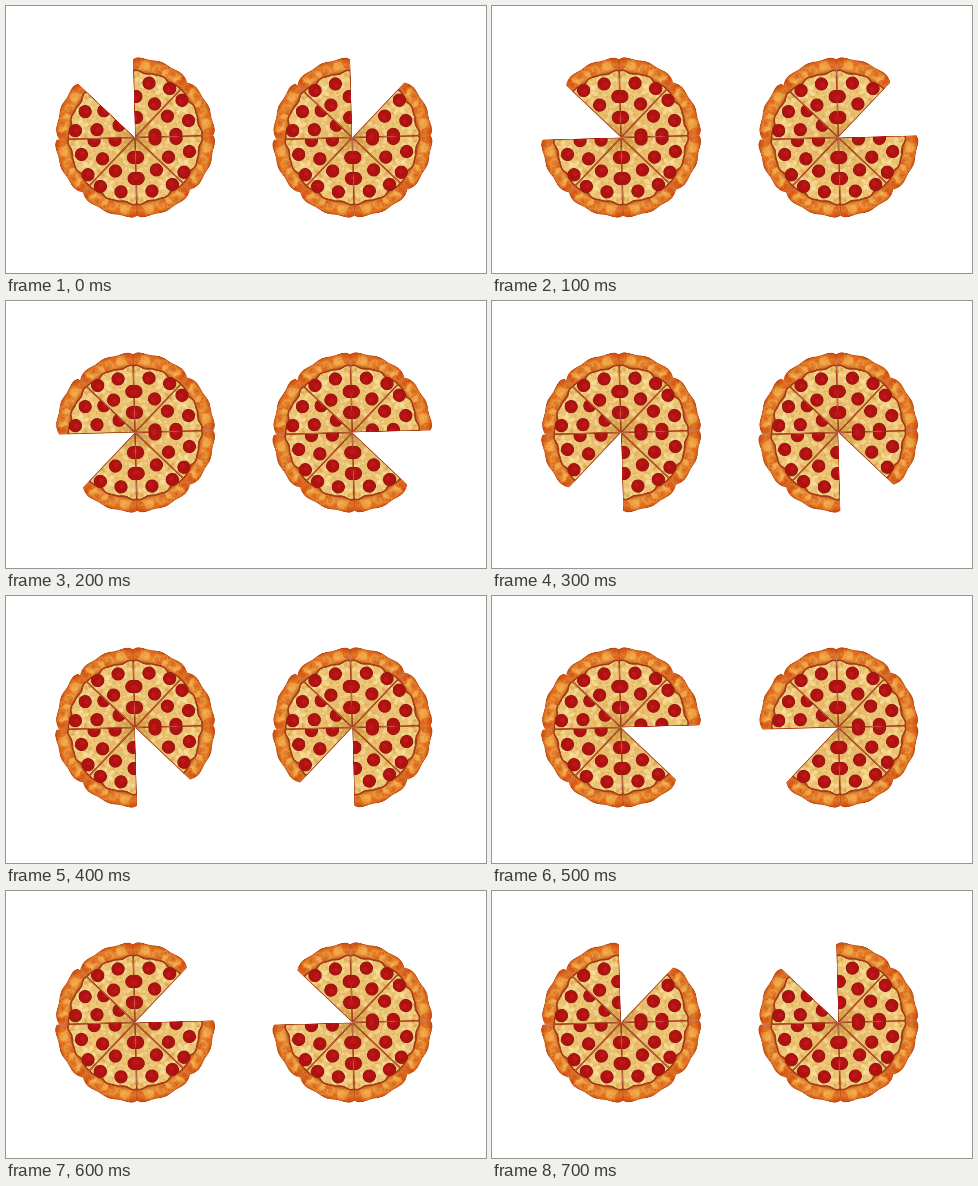
An HTML page with a canvas for the animation above (800 ms loop, 480 by 267 pixels).

```html
<!DOCTYPE html>
<html lang="en">
<head>
<meta charset="utf-8">
<title>Pizzas</title>
<style>
  html, body { margin: 0; height: 100%; overflow: hidden; background: #fff; }
  canvas { display: block; width: 100vw; height: 100vh; }
</style>
</head>
<body>
<canvas id="stage"></canvas>
<script>
const W = 480, H = 267, STEP = 100, SLICES = 8;
const TAU = Math.PI * 2, WEDGE = TAU / SLICES, TILT = -0.027;
const PAD = 2, SIZE = 86;
const scale = Math.max(1, window.devicePixelRatio || 1);
const stage = document.getElementById('stage');
stage.width = W * scale;
stage.height = H * scale;
const ctx = stage.getContext('2d');
ctx.scale(scale, scale);

// Pepperoni on one slice, whose first edge lies along the x axis
const pepperoni = [[20, 2], [41, 2], [33, 20.5], [54, 15.5], [48, 36]];

let seed = 7;
const rand = () => (seed = (seed * 16807) % 2147483647) / 2147483647;
const rim = t => 79.6 - 2 * t ** 4 - 1.5 * Math.abs(2 * t - 1) ** 12 + 0.6 * Math.sin(17 * t);
const cheeseEdge = t => 65.8 + Math.sin(13 * t + 1) + 0.5 * Math.sin(23 * t);

// Wedge with a wavy outer edge; t runs from 0 to 1 across the slice
function wedge(radius) {
  const path = new Path2D();
  path.moveTo(0, 0);
  for (let t = 0; t <= 1; t += 1 / 64) {
    const r = radius(t), a = t * WEDGE;
    path.lineTo(r * Math.cos(a), r * Math.sin(a));
  }
  path.closePath();
  return path;
}

function dot(c, x, y, r, fill) {
  c.fillStyle = fill;
  c.beginPath();
  c.arc(x, y, r, 0, TAU);
  c.fill();
}

function speckle(c, count, r0, r1, size, colors) {
  for (let i = 0; i < count; i++) {
    const a = rand() * WEDGE, r = Math.sqrt(r0 * r0 + rand() * (r1 * r1 - r0 * r0));
    dot(c, r * Math.cos(a), r * Math.sin(a), size * (0.4 + rand()), colors[i % colors.length]);
  }
}

function radial(c, r0, r1, colors) {
  const g = c.createRadialGradient(0, 0, r0, 0, 0, r1);
  colors.forEach((color, i) => g.addColorStop(i / (colors.length - 1), color));
  return g;
}

function bakeSlice() {
  const canvas = document.createElement('canvas');
  canvas.width = canvas.height = SIZE * scale * 2;
  const c = canvas.getContext('2d');
  c.scale(scale * 2, scale * 2);
  c.translate(PAD, PAD);
  const crust = wedge(rim), cheese = wedge(cheeseEdge);
  c.clip(crust);

  c.fillStyle = radial(c, 65, 80, ['#c2541a', '#e8973c', '#f0a545', '#e5852b', '#c04a0e']);
  c.fill(crust);
  speckle(c, 45, 68, 79, 2.2, ['rgba(200,62,10,.35)', 'rgba(250,190,95,.35)', 'rgba(222,98,20,.35)']);
  for (const a of [0, WEDGE]) {
    dot(c, 75 * Math.cos(a), 75 * Math.sin(a), 8, 'rgba(200,55,5,.4)');
  }
  c.strokeStyle = 'rgba(170,55,10,.6)';
  c.stroke(crust);

  c.fillStyle = radial(c, 0, 66, ['#cb9444', '#e6b968', '#ebc375', '#ebc375']);
  c.fill(cheese);
  c.save();
  c.clip(cheese);
  speckle(c, 150, 6, 66, 1.7, ['rgba(252,230,165,.55)', 'rgba(212,150,55,.4)', 'rgba(244,206,125,.5)']);
  c.restore();
  c.strokeStyle = '#a33a16';
  c.lineWidth = 1.6;
  c.stroke(cheese);

  for (const [x, y] of pepperoni) {
    dot(c, x, y, 6.6, '#8f1a10');
    dot(c, x, y, 5.8, '#b01212');
    dot(c, x - 1, y - 1, 2.5, 'rgba(200,28,24,.6)');
  }
  return canvas;
}

const slice = bakeSlice();

// Neighbouring slices mirror each other, except one laid the other way round
const mirrored = k => k % 2 === 1 || k === 4;

function drawPizza(x, y, missing) {
  for (let k = 0; k < SLICES; k++) {
    if (k === missing) continue;
    const flip = mirrored(k);
    ctx.save();
    ctx.translate(x, y);
    ctx.rotate(TILT + (k + flip) * WEDGE);
    if (flip) ctx.scale(1, -1);
    ctx.drawImage(slice, -PAD, -PAD, SIZE, SIZE);
    ctx.restore();
  }
}

function frame(now) {
  const step = Math.floor(now / STEP) % SLICES;
  ctx.fillStyle = '#fff';
  ctx.fillRect(0, 0, W, H);
  drawPizza(129, 131.5, (13 - step) % SLICES);
  drawPizza(346.3, 131.5, (6 + step) % SLICES);
}

const origin = performance.now();
(function loop() {
  frame(Math.max(0, performance.now() - origin));
  requestAnimationFrame(loop);
})();
</script>
</body>
</html>
```
